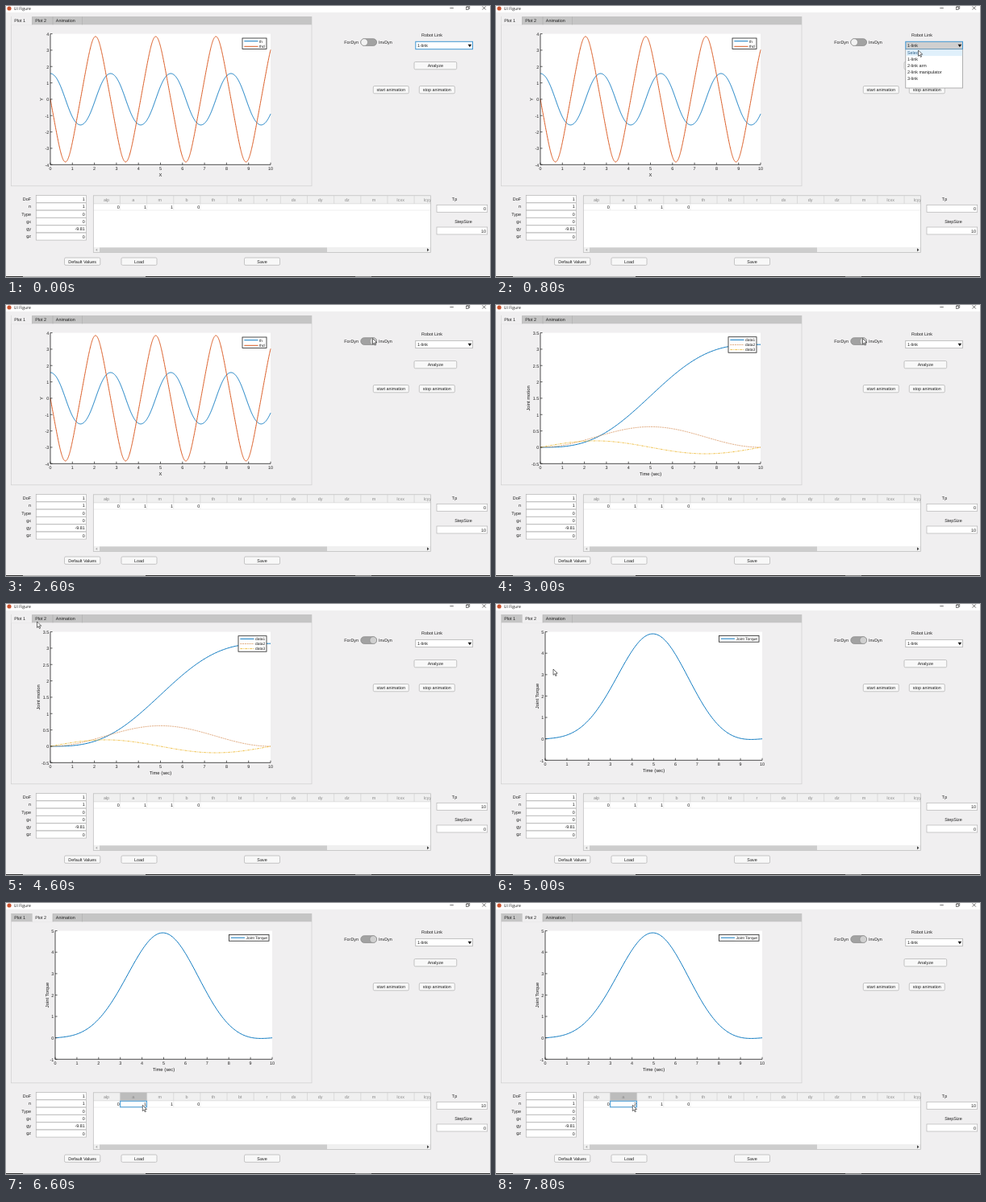
Recreate the animation shown at these times as an HTML page with a canvas. Size 600 by 337 pixels, loop 8000 ms.

```html
<!DOCTYPE html>
<html>
<head>
<meta charset="utf-8">
<style>
html, body { margin: 0; width: 100%; height: 100%; overflow: hidden; background: #f0f0f0; }
canvas { display: block; }
</style>
</head>
<body>
<canvas></canvas>
<script>
const LOOP = 8000, STEP = 200;
const BLUE = '#0072bd', ORANGE = '#d95319', YELLOW = '#edb120', INK = '#1c1c1c', FOCUS = '#3f97d3';
const TAU = 2 * Math.PI;

const canvas = document.querySelector('canvas');
const ratio = window.devicePixelRatio || 1;
canvas.width = 600 * ratio;
canvas.height = 337 * ratio;
canvas.style.width = '600px';
canvas.style.height = '337px';
const ctx = canvas.getContext('2d');
ctx.scale(ratio, ratio);

// Pointer tip: time, x, y
const PATH = [
  [200, 545, 52], [600, 526, 54], [800, 523.5, 55], [1000, 523, 56], [1600, 454.5, 41.5], [3000, 454.5, 41.5],
  [3600, 200, 12], [3800, 70, 6], [4000, 38, 11.5], [4200, 38.5, 22], [4800, 38.5, 22],
  [5600, 168.5, 258], [6000, 169.3, 251.3], [8000, 169.3, 251.3]
];

function rect(x, y, w, h, fill, stroke, line = 0.7) {
  if (fill) { ctx.fillStyle = fill; ctx.fillRect(x, y, w, h); }
  if (stroke) { ctx.strokeStyle = stroke; ctx.lineWidth = line; ctx.strokeRect(x, y, w, h); }
}

function pill(x, y, w, h, r, fill, stroke) {
  ctx.beginPath();
  ctx.roundRect(x, y, w, h, r);
  ctx.fillStyle = fill;
  ctx.fill();
  ctx.strokeStyle = stroke;
  ctx.lineWidth = 0.7;
  ctx.stroke();
}

function polyline(points, color, width = 0.7, dash = []) {
  ctx.beginPath();
  points.forEach(([x, y]) => ctx.lineTo(x, y));
  ctx.strokeStyle = color;
  ctx.lineWidth = width;
  ctx.setLineDash(dash);
  ctx.stroke();
  ctx.setLineDash([]);
}

function polygon(points, fill) {
  ctx.beginPath();
  points.forEach(([x, y]) => ctx.lineTo(x, y));
  ctx.closePath();
  ctx.fillStyle = fill;
  ctx.fill();
}

// y is the middle of the capitals
function text(s, x, y, align = 'left', size = 5.4, color = INK, font = '"Liberation Sans", Arial, sans-serif') {
  ctx.font = `${size}px ${font}`;
  ctx.textRendering = 'geometricPrecision';
  ctx.textAlign = align;
  ctx.fillStyle = color;
  ctx.fillText(s, x, y + size * 0.36);
}

function button(label, x, y, w) {
  pill(x, y, w, 9.3, 1.5, '#f8f8f8', '#b0b0b0');
  text(label, x + w / 2, y + 4.7, 'center');
}

function field(value, x, y, w) {
  rect(x, y, w, 9, '#fff', '#b4b4b4');
  text(value, x + w - 1.7, y + 4.6, 'right');
}

// Swinging link: th'' = -0.75 g sin(th), released from 90 degrees
function swing() {
  const dt = 0.01, acc = a => -0.75 * 9.81 * Math.sin(a);
  const angle = [], speed = [];
  let th = Math.PI / 2, v = 0;
  for (let i = 0; i <= 1000; i++) {
    angle.push([i * dt, th]);
    speed.push([i * dt, v]);
    v += acc(th) * dt / 2;
    th += v * dt;
    v += acc(th) * dt / 2;
  }
  return [angle, speed];
}

const sample = f => Array.from({ length: 201 }, (_, i) => [i / 20, f(i / 20)]);

// Cycloidal move of half a turn in ten seconds
const position = t => Math.PI * (t / 10 - Math.sin(TAU * t / 10) / TAU);
const velocity = t => Math.PI / 10 * (1 - Math.cos(TAU * t / 10));
const acceleration = t => Math.PI * TAU / 100 * Math.sin(TAU * t / 10);
const torque = t => 4.905 * Math.sin(position(t)) + 2 / 3 * acceleration(t);

const [angle, speed] = swing();
const PLOTS = {
  swing: {
    left: 55, right: 328, bottom: 197.3, min: -4, max: 4, tick: 1, xName: 'X', yName: 'Y', yNameX: 44,
    legend: [293, 40, 30, 13.5, 6.6],
    series: [['th', angle, BLUE], ['thd', speed, ORANGE]]
  },
  joint: {
    left: 55, right: 328, bottom: 197.3, min: -0.5, max: 3.5, tick: 0.5, xName: 'Time (sec)', yName: 'Joint motion', yNameX: 40,
    legend: [288, 39.7, 35, 19.5, 6.1],
    series: [
      ['data1', sample(position), BLUE],
      ['data2', sample(velocity), '#d58a50', [2, 0.8], 0.7],
      ['data3', sample(acceleration), YELLOW, [3, 1, 1, 1], 0.8]
    ]
  },
  torque: {
    left: 61, right: 330, bottom: 194.3, min: -1, max: 5, tick: 1, xName: 'Time (sec)', yName: 'Joint Torque', yNameX: 50.5,
    legend: [276.5, 39.5, 49.5, 7.7, 6],
    series: [['Joint Torque', sample(torque), BLUE]]
  }
};

function drawPlot(p) {
  const top = 34.6;
  const px = x => p.left + x / 10 * (p.right - p.left);
  const py = y => p.bottom - (y - p.min) / (p.max - p.min) * (p.bottom - top);
  rect(p.left, top, p.right - p.left, p.bottom - top, '#fff');
  for (const [, points, color, dash, width = 0.95] of p.series)
    polyline(points.map(([x, y]) => [px(x), py(y)]), color, width, dash);
  polyline([[p.left, top], [p.left, p.bottom], [p.right, p.bottom]], '#222', 0.8);
  for (let x = 0; x <= 10; x++) {
    polyline([[px(x), p.bottom], [px(x), p.bottom - 2.6]], '#222', 0.7);
    text(x, px(x), p.bottom + 5, 'center');
  }
  for (let y = p.min; y <= p.max; y += p.tick) {
    polyline([[p.left, py(y)], [p.left + 2.6, py(y)]], '#222', 0.7);
    text(y, p.left - 1.7, py(y) + 0.3, 'right');
  }
  text(p.xName, (p.left + p.right) / 2, p.bottom + 12.2, 'center', 5.8);
  ctx.save();
  ctx.translate(p.yNameX, (top + p.bottom) / 2);
  ctx.rotate(-Math.PI / 2);
  text(p.yName, 0, 0, 'center', 5.8);
  ctx.restore();

  const [x, y, w, h, gap] = p.legend;
  rect(x, y, w, h, '#fff', '#222', 0.8);
  p.series.forEach(([name, , color, dash, width = 0.95], i) => {
    const row = y + 3.7 + i * gap;
    polyline([[x + 2.3, row], [x + 19.5, row]], color, width, dash);
    text(name, x + 21, row + 0.1, 'left', 4.9);
  });
}

function drawWindow() {
  rect(0, 0, 600, 337, '#f0eff0');
  rect(0, 0, 600, 8, '#fff');
  ctx.beginPath();
  ctx.arc(4, 3, 2.6, 0, TAU);
  ctx.fillStyle = '#c9512c';
  ctx.fill();
  text('UI Figure', 9.8, 3, 'left', 5.1, INK, '"Open Sans", sans-serif');
  polyline([[550.3, 2.6], [554.8, 2.6]], '#333');
  rect(570.3, 1.2, 3.2, 3.2, null, '#333', 0.6);
  polyline([[571.5, 1], [571.5, 0.2], [574.7, 0.2], [574.7, 3.4], [573.8, 3.4]], '#333', 0.6);
  polyline([[590.6, 0.4], [594.8, 4.6]], '#333');
  polyline([[594.8, 0.4], [590.6, 4.6]], '#333');
  rect(0, 336, 600, 1, '#303030');
  rect(21, 336, 152, 1, '#b8b8b8');
  rect(433, 336, 20, 1, '#808080');
}

function drawTabs(active) {
  rect(6.5, 13.3, 372.5, 210.5, '#f0eff0', '#cfcfcf');
  rect(6.5, 13, 372.5, 10.3, '#c5c5c5');
  [['Plot 1', 6.5, 26], ['Plot 2', 32.5, 25.5], ['Animation', 58, 36.5]].forEach(([name, x, w], i) => {
    if (i === active) rect(x, 13, w, 10.6, '#f0eff0');
    polyline([[x + w, 13.3], [x + w, 23.3]], '#adadad', 0.6);
    text(name, x + 3.8, 18.2);
  });
}

function drawControls(t) {
  const open = t >= 400 && t < 2000, on = t >= 2200;
  text('ForDyn', 437, 45.2, 'right');
  text('InvDyn', 462, 45.2);
  pill(439.8, 40.7, 19.8, 8.7, 4.35, '#a2a2a2', '#858585');
  pill(on ? 450.9 : 439.8, 40.7, 8.7, 8.7, 4.35, on ? '#d0d0d0' : '#f2f2f2', '#8c8c8c');

  button('Analyze', 506, 69.5, 52.7);
  button('start animation', 455.3, 99.5, 44);
  button('stop animation', 512.3, 99.5, 44);

  text('Robot Link', 528, 36.2, 'center');
  rect(507.8, 44.3, 70.7, 9.4, open ? '#cfcfcf' : '#fff', t < 2000 ? FOCUS : '#a8a8a8', t < 2000 ? 1 : 0.7);
  text('1-link', 510, 49.2);
  polygon([[572.6, 47.7], [577.2, 47.7], [574.9, 51.3]], '#111');
  if (open) {
    rect(507.8, 54, 70.7, 48, '#fff', '#8f8f8f');
    rect(508.3, 54.3, 69.8, 7.8, '#e0f0fb');
    ['Select', '1-link', '2-link arm', '2-link manipulator', '3-link']
      .forEach((name, i) => text(name, 510, 58.2 + i * 8, 'left', 5.4, i ? INK : '#2b5f86'));
  }

  const swapped = t >= 3200;
  text('Tp', 556, 240.3, 'center');
  field(swapped ? '10' : '0', 534, 247.3, 62.7);
  text('StepSize', 567, 268.2, 'center');
  field(swapped ? '0' : '10', 534, 275, 62.7);

  Object.entries({ DoF: '1', n: '1', Type: '0', gx: '0', gy: '-9.81', gz: '0' }).forEach(([name, value], i) => {
    const y = 235.6 + i * 9.3;
    text(name, 31, y + 4.4, 'right');
    field(value, 37.3, y, 62.2);
  });
  button('Default Values', 72.5, 313, 44.3);
  button('Load', 143, 313, 44);
  button('Save', 295.5, 313, 44);
}

function drawTable(t) {
  const selected = t >= 6400, colX = i => 108.3 + i * 33.15;
  ctx.save();
  ctx.beginPath();
  ctx.rect(108, 235, 419, 72);
  ctx.clip();
  rect(108.3, 235.8, 418.3, 70.5, '#fff');
  rect(108.3, 235.8, 418.3, 10, '#f0f0f0');
  if (selected) rect(colX(1), 235.8, 33.15, 10, '#bcbcbc');
  ['alp', 'a', 'm', 'b', 'th', 'bt', 'r', 'dx', 'dy', 'dz', 'm', 'Icxx', 'Icyy'].forEach((name, i) => {
    polyline([[colX(i + 1), 236], [colX(i + 1), 245.8]], '#cdcdcd', 0.6);
    if (i === 12) text(name, 517.5, 241, 'left', 5.4, '#858585');
    else text(name, colX(i) + 16.2, 241, 'center', 5.4, '#858585');
  });
  polyline([[108.3, 245.8], [527, 245.8]], '#cfcfcf', 0.6);
  polyline([[108.3, 254], [527, 254]], '#e4e4e4', 0.6);
  ['0', t >= 7600 ? '2' : '1', '1', '0'].forEach((value, i) => {
    polyline([[colX(i + 1), 246], [colX(i + 1), 254]], '#e2e2e2', 0.6);
    text(value, colX(i + 1) - 0.7, 250.1, 'right');
  });
  if (selected) rect(colX(1) + 0.2, 246.3, 32.8, 7.5, null, FOCUS, 1);
  rect(108.3, 300, 418.3, 6.3, '#f0f0f0');
  rect(116, 300.4, 282, 5.6, '#cdcdcd');
  polygon([[113.2, 301.4], [113.2, 305], [111, 303.2]], '#b0b0b0');
  polygon([[522, 301.2], [522, 305.2], [524.5, 303.2]], '#444');
  ctx.restore();
  rect(108.3, 235.8, 418.3, 70.7, null, '#b8b8b8');
}

function drawPointer(t) {
  const next = PATH.findIndex(p => p[0] > t);
  if (next < 1) return;
  const [t0, x0, y0] = PATH[next - 1], [t1, x1, y1] = PATH[next];
  const k = (t - t0) / (t1 - t0);
  ctx.save();
  ctx.translate(x0 + (x1 - x0) * k, y0 + (y1 - y0) * k);
  const arrow = [[0, 0], [0, 7.4], [1.7, 5.8], [2.9, 8.5], [4.1, 8], [2.9, 5.3], [5.2, 5.2]];
  polygon(arrow, '#fff');
  polyline([...arrow, arrow[0]], '#111', 0.6);
  ctx.restore();
}

function draw(now) {
  const t = Math.floor(now % LOOP / STEP) * STEP;
  const second = t >= 4800;
  drawWindow();
  drawTabs(second ? 1 : 0);
  drawPlot(second ? PLOTS.torque : t >= 3000 ? PLOTS.joint : PLOTS.swing);
  drawControls(t);
  drawTable(t);
  drawPointer(t);
}

const start = performance.now();
(function frame() {
  draw(performance.now() - start);
  requestAnimationFrame(frame);
})();
</script>
</body>
</html>
```
